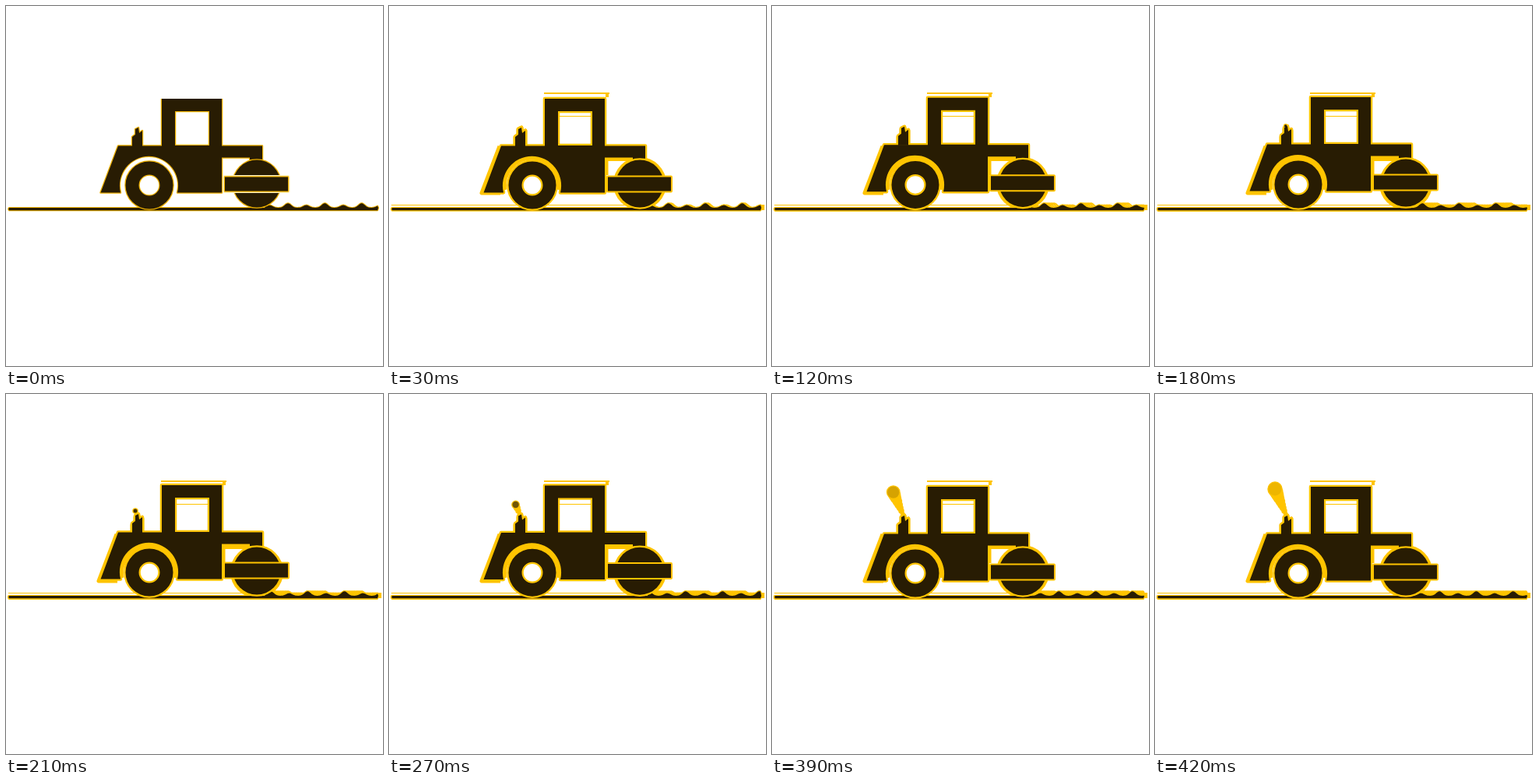
Recreate the animation shown at these times as an HTML page with a canvas. Size 484x462 px, loop 450 ms.

```html
<!DOCTYPE html>
<html>
<head>
<meta charset="utf-8">
<style>
html, body { margin: 0; width: 100%; height: 100%; overflow: hidden; background: #fff; }
canvas { display: block; }
</style>
</head>
<body>
<canvas id="stage" width="484" height="462"></canvas>
<script>
const ctx = document.getElementById('stage').getContext('2d');
const DARK = '#281c03', GOLD = '#ffc400', EDGE = '#edb000';
const STEP = 30, STEPS = 15, PERIOD = 47.3;

const body = new Path2D(`M144 179.5H200V119H277V179.5H329V197H313V194.5H277V239.5H220
  A37.6 37.6 0 1 0 147 239.5H121.5Z M217 135V179H261V135Z`);
const chimney = new Path2D('M162 180V168L166 165V158L170 156L171 163L175 160V180Z');
const arch = new Path2D('M149 236A35 35 0 1 1 218 236');
const slope = new Path2D('M142 180L119 240H143');
const bracket = new Path2D('M313 196.5H279V217');
const box = new Path2D('M281 219.5H362V237.5H281Z');
const roller = new Path2D();
roller.arc(322, 228, 30.5, 0, 7);
const wheel = new Path2D();
wheel.arc(184, 230, 30.5, 0, 7);
wheel.closePath();
wheel.moveTo(197.5, 230);
wheel.arc(184, 230, 13.5, 0, 7);

const lift = k => -2 * Math.sin(Math.PI * k / (STEPS - 1)) ** 2;

function at(dy, draw) {
  ctx.save();
  ctx.translate(0, dy);
  draw();
  ctx.restore();
}

function stroke(path, color, width) {
  ctx.strokeStyle = color;
  ctx.lineWidth = width;
  ctx.stroke(path);
}

function fill(path, color = DARK) {
  ctx.fillStyle = color;
  ctx.fill(path, 'evenodd');
}

// Flat road with alternating tall and low bumps ahead of the roller
function roadPath(k) {
  const shift = PERIOD * k / STEPS;
  const bump = (x, center, height) => {
    const d = (x - center + shift + PERIOD * 20.5) % PERIOD - PERIOD / 2;
    return height * Math.exp(-d * d / 32);
  };
  const road = new Path2D('M4 262.3Q2.5 260.5 4 259H332');
  for (let x = 333; x <= 477; x++) {
    road.lineTo(x, 259 - bump(x, 362, 5.8) - bump(x, 338.3, 3.4));
  }
  road.lineTo(478, 259);
  road.lineTo(477, 262.3);
  road.closePath();
  return road;
}

function puff(k) {
  const age = k * STEP - 210;
  const path = new Path2D();
  if (age >= -30) path.arc(166 - 0.057 * age, 150 - 0.133 * age, 2.5 + 0.0286 * age, 0, 7);
  return path;
}

// Gold left behind by every earlier pose of the loop
function drawTrail(k) {
  for (let i = 0; i <= k; i++) {
    stroke(roadPath(i), GOLD, 2);
    fill(puff(i), GOLD);
    stroke(puff(i), GOLD, 2.5);
  }
  ctx.fillStyle = GOLD;
  ctx.fillRect(3, 255, 322, 1);
  ctx.fillRect(477, 255, 5, 7);
  ctx.fillRect(199, 111, 84, 2);
  ctx.fillRect(278, 113, 4, 4);
  ctx.fillRect(218, 141, 42, 1);
  stroke(slope, GOLD, 5);
  stroke(arch, GOLD, 5);
  stroke(chimney, GOLD, 5);
  stroke(bracket, GOLD, 5);
  stroke(roller, GOLD, 7);
}

function drawScene(k) {
  const dy = lift(k), moving = k > 0;
  const color = moving ? GOLD : EDGE;
  const halo = moving ? 4.5 : 2.5;
  ctx.fillStyle = '#fff';
  ctx.fillRect(0, 0, 484, 462);
  ctx.lineJoin = 'round';
  if (moving) drawTrail(k);

  const road = roadPath(k);
  stroke(road, color, 2);
  fill(road);

  at(dy, () => {
    stroke(body, color, halo);
    stroke(chimney, color, halo);
    fill(body);
    fill(chimney);
  });
  if (!moving) {
    ctx.fillStyle = '#fff';
    ctx.fillRect(198, 117, 81, 2);
  }
  at(dy / 2, () => {
    stroke(wheel, color, halo);
    fill(wheel);
    stroke(roller, color, halo);
    fill(roller);
  });
  at(dy, () => {
    if (!moving) stroke(box, '#fff3c4', 5);
    stroke(box, color, moving ? 4 : 2.5);
    fill(box);
  });

  ctx.globalAlpha = Math.max(0, Math.min(1, 1 - (k * STEP - 180) / 260));
  fill(puff(k));
  ctx.globalAlpha = 1;
}

function tick(now) {
  drawScene(Math.floor(now / STEP) % STEPS);
  requestAnimationFrame(tick);
}
tick(0);
</script>
</body>
</html>
```
